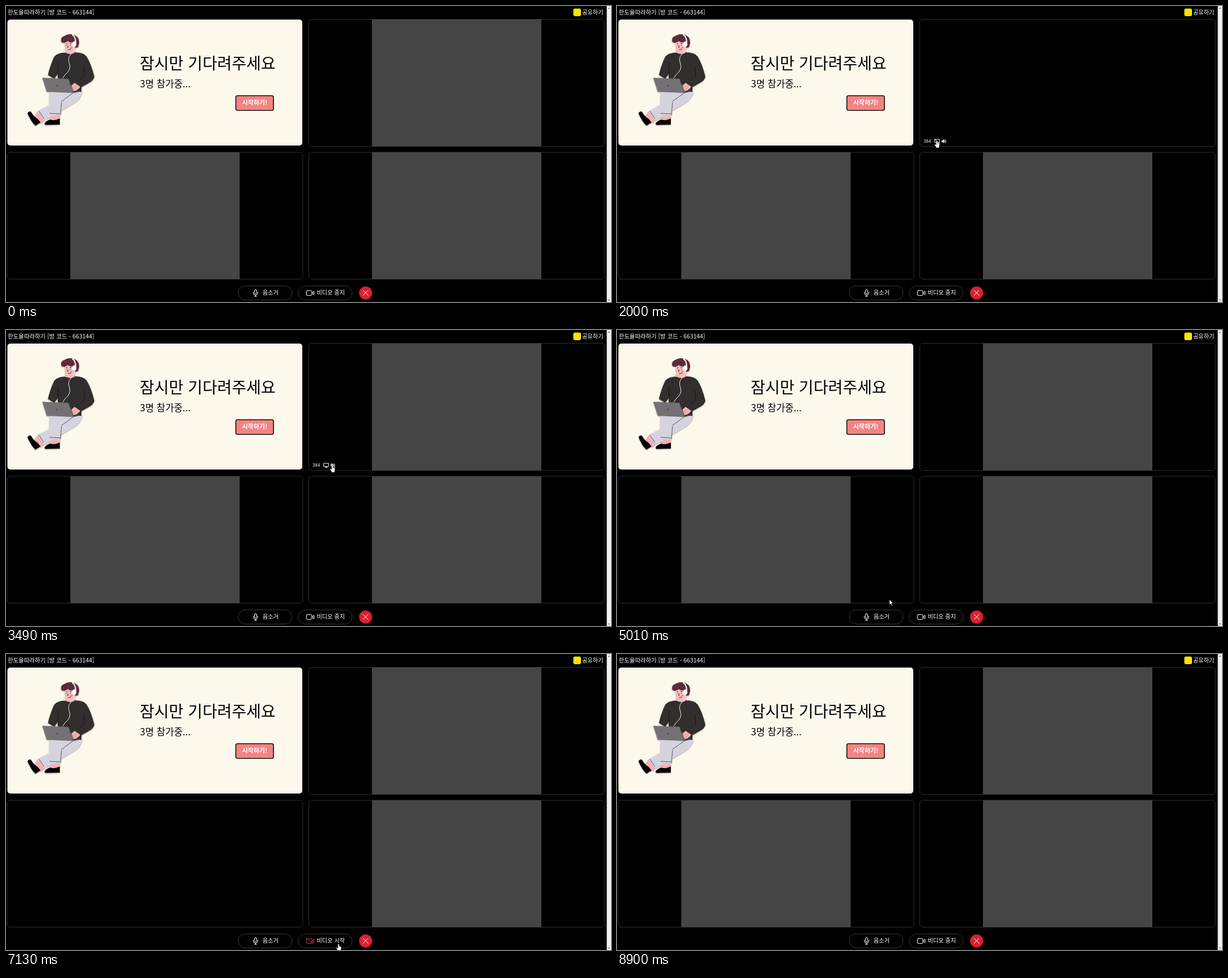
Animation of 1068x524 px, one loop 9110 ms. Source, as an HTML page:

```html
<!DOCTYPE html>
<html lang="ko">
<head>
<meta charset="utf-8">
<title>화상 회의 방</title>
<style>
  html, body { margin: 0; width: 100%; height: 100%; overflow: hidden; background: #000; }
  svg { display: block; }
  text { font-family: "Noto Sans CJK KR", "Noto Sans KR", "Noto Sans", sans-serif; fill: #fff; font-size: 10.2px; }
  .card text { fill: #000; }
  .tile { fill: #000; stroke: #303030; }
  .video { fill: #454546; }
  .pill { fill: #000; stroke: #383838; }
  .icon { fill: none; stroke: #fff; stroke-linecap: round; stroke-linejoin: round; }
  .off { stroke: #d8363a; }
  .name { font-size: 8px; }
  .man { filter: drop-shadow(0.5px 1px 0.8px rgba(0, 0, 0, .35)); }
</style>
</head>
<body>
<svg width="1068" height="524" viewBox="0 0 1068 524">
  <defs>
    <g id="mic">
      <rect x="-2" y="-6" width="4" height="7.6" rx="2"/>
      <path d="M-3.9-1.4V0a3.9 3.9 0 0 0 7.8 0v-1.4M0 4v2M-2 6h4"/>
    </g>
    <g id="camera">
      <rect x="-6.7" y="-4.2" width="9.6" height="8.6" rx="1.6"/>
      <path d="M4.4-1.4 6.8-3v6.2L4.4 1.6z"/>
    </g>
    <path id="screen" d="M-4-3.5h8v5.6h-8zM0 2.1v1.7M-2 3.8h4"/>
    <g id="speaker">
      <path d="M-3.6-1.2h1.6L.1-3.1v6.2L-2 1.2h-1.6z" fill="#fff" stroke-width=".6"/>
      <path d="M1.5-1.4a2 2 0 0 1 0 2.8M2.2-3a3.7 3.7 0 0 1 0 6"/>
    </g>
  </defs>

  <rect width="1068" height="524"/>
  <text x="3" y="15" style="font-size:10.4px">한도율따라하기 [방 코드 - 663144]</text>
  <rect x="1001.5" y="4.5" width="13.5" height="13.5" rx="3" fill="#fbe300"/>
  <text x="1017" y="14.6">공유하기</text>

  <g class="card">
    <rect x="2.5" y="24" width="520.5" height="223" rx="5" fill="#fdf8ec"/>
    <g class="man" stroke-linejoin="round">
      <path d="M78 192 95 193 95 203 77 204Z" fill="#f4b0b4"/>
      <path d="M57 185 68 202 61 208 50 195Z" fill="#f4b0b4"/>
      <path d="M38 190Q40 186 44 187Q48 195 56 200L61 206 52 212Q45 206 38 190Z"/>
      <path d="M68 208Q70 204 78 201Q86 204 95 199V210L69 210.5Z"/>
      <path d="M94 150H135Q134 163 121 171L68 203 56 186 96 165Z" fill="#d5d4de"/>
      <path d="M77 151H118Q104 160 98 170L96 194 76 193Z" fill="#d5d4de"/>
      <path d="M58 186 67 199M77 190 95 191M98 170 96 193M98 169 121 152" fill="none" stroke="#34323b" stroke-width=".8"/>
      <path d="M104 77 121 72 123 86Q113 91 106 85Z" fill="#f5b5b8"/>
      <path d="M94 84Q104 81 108 84Q116 87 122 82Q136 82 142 89Q150 101 156 125Q155 132 145 137L129 146 122 140 134 128 133 152H90L92 120 85 129 74 122Q78 105 85 90Q88 86 94 84Z" fill="#312e2d"/>
      <path d="M92 100V127M137 107 139 123 131 130" fill="none" stroke="#131212" stroke-width=".9"/>
      <path d="M104 62Q103 75 107 80Q113 84 119 77Q125 75 125 67L122 57H105Z" fill="#f7bbbd"/>
      <path d="M98 64Q95 56 103 53Q110 48 119 51Q130 54 129 66L127 73 122 74 119 65Q112 65 109 62Q104 67 98 64Z" fill="#5b2b3a"/>
      <path d="M117 51Q123 54 123 65" fill="none" stroke="#fff" stroke-width="2"/>
      <ellipse cx="120.5" cy="67.5" rx="3.8" ry="5" fill="#fff"/>
      <path d="M107 69.5v1M113.5 69v1M106 67l2-.5M112.5 66.5h2.5M110 70l-1.4 3.2 1.4.3M109.5 77Q112.5 78 115 75.5" fill="none" stroke="#30191f"/>
      <circle cx="115.5" cy="73.5" r="1.7" fill="#ee8b93"/>
      <path d="M121 72Q121 80 114 86Q108 93 112 102Q116 112 104 122L100 128" fill="none" stroke="#eee"/>
      <path d="M112 144 121 136 131 143Q127 150 117 151Z" fill="#f5b5b8"/>
      <path d="M116 145 124 141M118 148 126 144" stroke="#b96f76" stroke-width=".6"/>
      <path d="M64 127 110 129 119 154 72 152Z" fill="#737173"/>
      <path d="M110 129 119 154 132 151 130 149 119 151 112 131Z" fill="#454345"/>
      <circle cx="90" cy="141" r="1.8" fill="#555356"/>
    </g>
    <text x="236" y="112" style="font-size:28px">잠시만 기다려주세요</text>
    <text x="236.5" y="144.3" style="font-size:16.7px">3명 참가중...</text>
    <rect x="405.7" y="158.7" width="66.5" height="26" rx="3" fill="#f28482" stroke="#121212" stroke-width="1.6"/>
    <text x="439" y="175" text-anchor="middle" style="font-size:11px;font-weight:700;fill:#fff">시작하기!</text>
  </g>

  <rect class="tile" x="534.5" y="23.5" width="521.5" height="225" rx="5"/>
  <rect class="tile" x="2" y="259" width="522" height="224.5" rx="5"/>
  <rect class="tile" x="534.5" y="259" width="521.5" height="224.5" rx="5"/>
  <rect class="video" id="peerVideo" x="646" y="24" width="299" height="224.5"/>
  <rect class="video" id="ownVideo" x="113.5" y="259" width="299" height="224.5"/>
  <rect class="video" x="646" y="259" width="299" height="224.5"/>

  <g id="topLabel">
    <text class="name" x="541" y="242.3">384</text>
    <g class="icon">
      <use href="#screen" x="565.3" y="239.5"/>
      <use href="#speaker" x="577" y="239.5"/>
    </g>
  </g>
  <path id="screenSlash" class="icon" d="M561 235.5 570 244"/>
  <path id="speakerSlash" class="icon" d="M573.5 236 581 243.5"/>
  <g id="lowLabel">
    <text class="name" x="541" y="477.3">592</text>
    <g class="icon">
      <use href="#screen" x="565.3" y="474.5"/>
      <use href="#speaker" x="577" y="474.5"/>
    </g>
  </g>

  <rect class="pill" x="410" y="495.5" width="95" height="25" rx="12.5"/>
  <rect class="pill" x="516" y="495.5" width="95" height="25" rx="12.5"/>
  <g id="micOn">
    <use class="icon" href="#mic" x="440.5" y="508"/>
    <text x="453" y="511.4">음소거</text>
  </g>
  <g id="micOff">
    <g class="icon off"><use href="#mic" x="430.8" y="508"/><path d="M426.5 503 435.5 513"/></g>
    <text x="442.5" y="511.4">음소거 해제</text>
  </g>
  <g id="camOn">
    <use class="icon" href="#camera" x="537" y="508"/>
    <text x="548.5" y="511.4">비디오 중지</text>
  </g>
  <g id="camOff">
    <g class="icon off"><use href="#camera" x="537" y="508"/><path d="M530.5 503 543 513.5"/></g>
    <text x="548.5" y="511.4">비디오 시작</text>
  </g>
  <circle cx="634.8" cy="508" r="11.5" fill="#dc1f30"/>
  <path class="icon" d="M630.3 503.3l9 9m0-9l-9 9"/>

  <rect x="1060.5" width="7.5" height="524" fill="#f1f1f1"/>
  <path d="M1062.5 5l2-2.5 2 2.5zM1062.5 519.5l2 2.5 2-2.5z" fill="#777"/>

  <g id="cursor" stroke-linejoin="round">
    <path id="arrow" d="M0 0V9.4L2.2 7.5 3.7 11 5.2 10.3 3.7 7H6.4Z" fill="#fff" stroke="#000" stroke-width=".6"/>
    <path id="hand" d="M-1.2 1Q0-.6 1.2 1V4.2L4.3 5.2Q5.2 5.7 5 7L4.2 10.5V13H-1.4V11.2L-4 7.8Q-4.2 6.2-2.8 6.7L-1.2 8Z" fill="#fff" stroke="#000" stroke-width=".5"/>
  </g>
</svg>
<script>
const LOOP = 9110, STEP = 40;

// Pointer strokes: rows of [time, x, y], sampled every STEP from the first row.
const strokes = [
  [[1000, 659, 24], [1160, 636, 100], [1360, 592, 196], [1520, 570, 230], [1680, 564.5, 238]],
  [[3010, 564.5, 238], [3290, 576, 239]],
  [[4390, 576, 239], [4470, 579, 238], [4550, 573, 235]],
  [[4730, 573, 235], [4850, 540, 330], [5010, 481, 477], [5170, 461, 502], [5450, 469.5, 510.5]],
  [[6410, 469.5, 510.5], [6570, 500, 511], [6770, 566, 512], [6930, 587, 513]],
  [[8220, 587, 513], [8340, 628, 462], [8540, 800, 285], [8740, 970, 95], [8860, 1039, 4]]
];

const el = id => document.getElementById(id);
const show = (id, on) => el(id).setAttribute("visibility", on ? "visible" : "hidden");
const within = (v, a, b) => v >= a && v < b;

function pointer(t) {
  if (!within(t, 1000, 8900)) return null;
  const path = strokes.filter(s => s[0][0] <= t).pop();
  const start = path[0][0];
  const q = start + Math.floor((t - start) / STEP) * STEP;
  const i = path.findIndex(k => k[0] > q);
  if (i < 0) return path[path.length - 1].slice(1);
  const [a, b] = [path[i - 1], path[i]];
  const f = (q - a[0]) / (b[0] - a[0]);
  return [a[1] + (b[1] - a[1]) * f, a[2] + (b[2] - a[2]) * f];
}

function draw(t) {
  const p = pointer(t);
  const [x, y] = p || [-50, -50];
  const right = within(x, 534, 1056);
  const onIcon = within(x, 560, 583) && within(y, 234, 246);
  const onPill = within(y, 495, 521) && (within(x, 410, 505) || within(x, 516, 611));
  const muted = within(t, 5650, 6410);
  const camOff = within(t, 7130, 7820);

  el("cursor").setAttribute("transform", `translate(${x} ${y})`);
  show("hand", p && (onIcon || onPill));
  show("arrow", p && !onIcon && !onPill);

  const hover = right && within(y, 23, 249);
  show("topLabel", hover);
  show("lowLabel", right && within(y, 259, 484));
  show("screenSlash", hover && within(t, 2000, 2760));
  show("speakerSlash", hover && within(t, 3490, 4190));
  show("peerVideo", !within(t, 2000, 2800));
  show("ownVideo", !within(t, 7130, 7860));
  show("micOn", !muted);
  show("micOff", muted);
  show("camOn", !camOff);
  show("camOff", camOff);
}

const begin = performance.now();
function tick() {
  draw((performance.now() - begin) % LOOP);
  requestAnimationFrame(tick);
}
tick();
</script>
</body>
</html>
```
